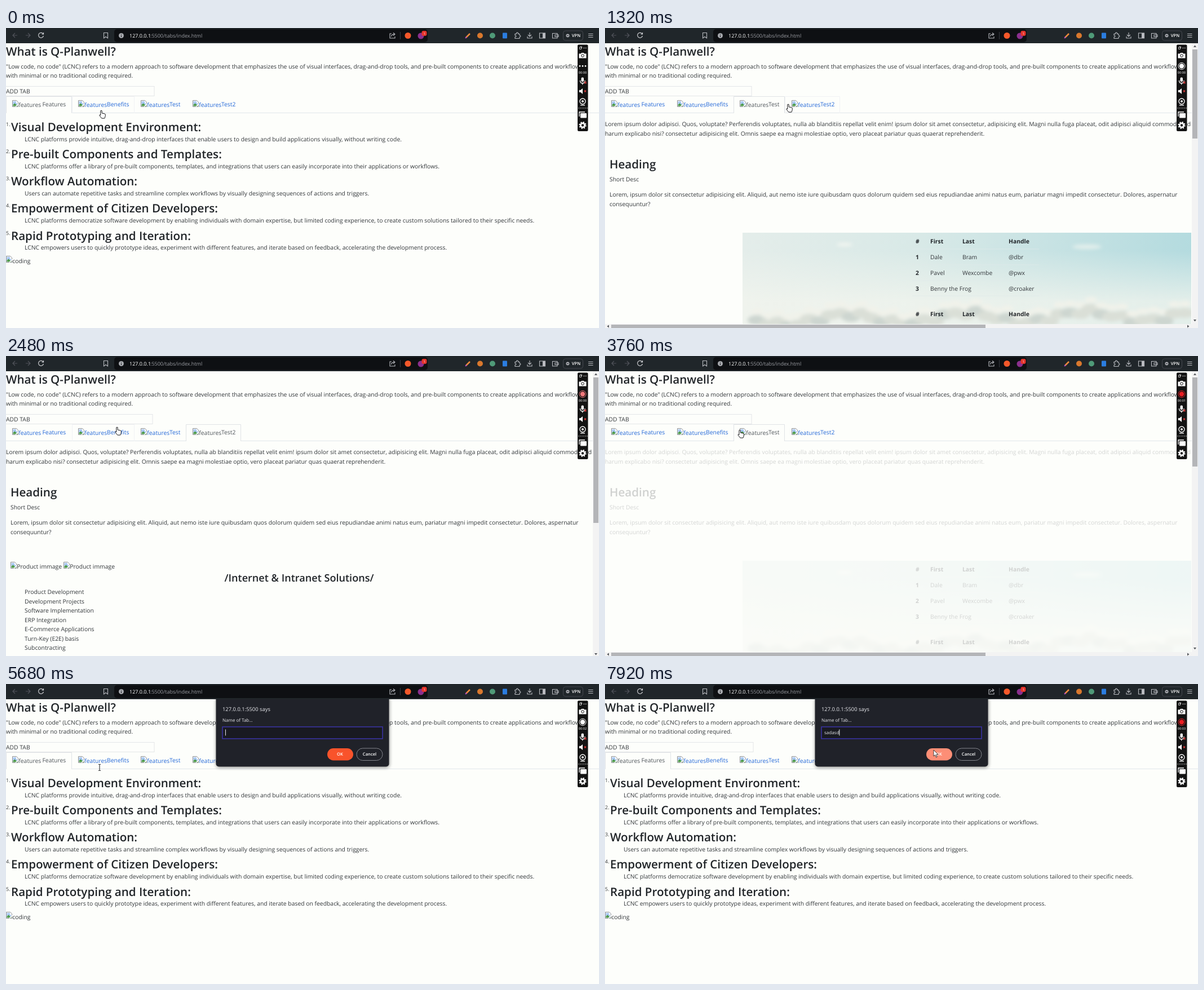
Animation, 1052 px wide and 532 px high, one loop 8 s. Source, as an HTML page:

```html
<!DOCTYPE html>
<html lang="en">
<head>
<meta charset="utf-8">
<title>Tabs demo</title>
<style>
html, body { margin: 0; width: 100%; height: 100%; overflow: hidden; background: #fdfefb; }
svg { display: block; }
text { font: 10.36px "Open Sans", sans-serif; fill: #33373b; text-rendering: geometricPrecision; }
.h2 { font-size: 20.6px; font-weight: 600; fill: #212529; }
.h3 { font-size: 18.1px; font-weight: 600; fill: #212529; text-anchor: middle; }
.b { font-weight: 700; fill: #212529; }
.num { font-size: 9px; }
.url { font-size: 9px; fill: #9a9ca2; }
.host { font-size: 9px; fill: #fff; }
.says { font-size: 9.4px; fill: #e8e9ed; }
.small { font-size: 8px; fill: #e8e9ed; }
.btn { font-size: 7.6px; font-weight: 600; fill: #fff; text-anchor: middle; }
.tiny { font-size: 5.6px; fill: #fff; text-anchor: middle; }
.tab text { fill: #2468d8; }
.tab.on text { fill: #50565c; }
.line { fill: none; stroke: #b9bbc0; stroke-width: 1.1; }
.white { fill: #fff; }
</style>
</head>
<body>
<svg width="1052" height="532" viewBox="0 0 1052 532">
  <defs>
    <linearGradient id="sky">
      <stop offset="0" stop-color="#e4edea"/><stop offset=".4" stop-color="#d8e9e7"/><stop offset="1" stop-color="#b4dbdf"/>
    </linearGradient>
    <linearGradient id="haze" x2="0" y2="1">
      <stop offset=".2" stop-color="#f3f5ee" stop-opacity="0"/><stop offset=".75" stop-color="#f3f5ee" stop-opacity=".75"/>
    </linearGradient>
    <filter id="soft"><feGaussianBlur stdDeviation="3"/></filter>
    <clipPath id="photo"><path d="M244 363H1040V525H244Z"/></clipPath>
    <symbol id="pic" overflow="visible">
      <path d="M.5 .5H7.5L10.5 3.5V11.5H.5Z" fill="#fff" stroke="#8b8f94"/>
      <path d="M1.5 2H7V5L9.5 6V8H1.5Z" fill="#a9c8f2"/>
      <path d="M1.5 10.5V8L4.5 5.5 10 10.5Z" fill="#4f9b4a"/>
      <path d="M6 11.5L11 6.5" stroke="#fff" stroke-width="1.5"/>
    </symbol>
  </defs>
  <g id="page"></g>
  <g id="panels"></g>
  <g id="scroll"></g>
  <g id="dialog"></g>
  <g id="chrome"></g>
  <g id="recorder"></g>
  <g id="cursor" stroke="#17181a" stroke-linejoin="round" fill="#fff">
    <path d="M-4.2 -6.2q1.2-1.4 2.4 0v4.2l4.6 1q1.8.5 1.6 2.2l-.6 3.6-1 2.4h-5l-3.8-4.8q-.6-1.6 1-1.4l.8.8z"/>
    <path d="M-2-5.5H-.5L0-5 .5-5.5H2M0-5V5M-2 5.5H-.5L0 5 .5 5.5H2" fill="none"/>
    <path d="M-2-7V4L.6 1.7 2.4 6 4.2 5.2 2.4 1.2H6Z" stroke-width=".8"/>
  </g>
</svg>
<script>
const $ = id => document.getElementById(id);
const text = (x, y, s, cls = '') => `<text x="${x}" y="${y}" class="${cls}">${s}</text>`;
const rect = (x, y, w, h, fill, rest = '') => `<rect x="${x}" y="${y}" width="${w}" height="${h}" fill="${fill}" ${rest}/>`;
const circle = (x, y, r, fill, rest = '') => `<circle cx="${x}" cy="${y}" r="${r}" fill="${fill}" ${rest}/>`;
const path = (d, rest = 'class="line"') => `<path d="${d}" ${rest}/>`;
const image = (x, y, alt, baseline = y + 12) => `<use href="#pic" x="${x}" y="${y}"/>` + text(x + 11.3, baseline, alt);

// Page header and tab strip
const edges = [0, 117, 228, 319, 417];
const tabShape = i => `M${edges[i] + .5} 151V121.5H${edges[i + 1] - .5}V151`;
$('page').innerHTML =
  text(0, 49, 'What is Q-Planwell?', 'h2') +
  text(0, 72, '"Low code, no code" (LCNC) refers to a modern approach to software development that emphasizes the use of visual interfaces, drag-and-drop tools, and pre-built components to create applications and workflows') +
  text(0, 88.3, 'with minimal or no traditional coding required.') +
  '<rect id="add" x="-.5" y="103.5" height="17" fill="none" stroke="#e4e6e8"/>' +
  text(0, 116, 'ADD TAB') +
  path('M0 150.5H1052', 'stroke="#e2e6ea"') +
  '<path id="hover" fill="none" stroke="#f1f2f4"/><path id="active" fill="#fdfefb" stroke="#e0e3e6"/>' +
  ['Features', 'Benefits', 'Test', 'Test2'].map((name, i) => {
    const x = [11, 128, 239, 331][i];
    return `<g class="tab">${image(x, 128, 'features', 140.3)}${text(x + (i ? 51 : 53.5), 139.2, name)}</g>`;
  }).join('');
const tabs = [...document.querySelectorAll('.tab')];

// Tab panels
const points = [
  ['Visual Development Environment:', 'LCNC platforms provide intuitive, drag-and-drop interfaces that enable users to design and build applications visually, without writing code.'],
  ['Pre-built Components and Templates:', 'LCNC platforms offer a library of pre-built components, templates, and integrations that users can easily incorporate into their applications or workflows.'],
  ['Workflow Automation:', 'Users can automate repetitive tasks and streamline complex workflows by visually designing sequences of actions and triggers.'],
  ['Empowerment of Citizen Developers:', 'LCNC platforms democratize software development by enabling individuals with domain expertise, but limited coding experience, to create custom solutions tailored to their specific needs.'],
  ['Rapid Prototyping and Iteration:', 'LCNC empowers users to quickly prototype ideas, experiment with different features, and iterate based on feedback, accelerating the development process.']
];
const features = points.map(([title, body], i) => {
  const y = 48.15 * i;
  return text(0, 174 + y, i + 1 + '.', 'num') + text(9, 183 + y, title, 'h2') + text(33, 200.5 + y, body);
}).join('') + image(0, 404, 'coding', 416.5);

const lorem =
  text(0, 174.2, 'Lorem ipsum dolor adipisci. Quos, voluptate? Perferendis voluptates, nulla ab blanditiis repellat velit enim! ipsum dolor sit amet consectetur, adipisicing elit. Magni nulla fuga placeat, odit adipisci aliquid commodi, sed') +
  text(0, 190.7, 'harum explicabo nisi? consectetur adipisicing elit. Omnis saepe ea magni molestiae optio, vero placeat pariatur quas quaerat reprehenderit.') +
  text(8, 249, 'Heading', 'h2') + text(8, 271.5, 'Short Desc') +
  text(8, 299, 'Lorem, ipsum dolor sit consectetur adipisicing elit. Aliquid, aut nemo iste iure quibusdam quos dolorum quidem sed eius repudiandae animi natus eum, pariatur magni impedit consectetur. Dolores, aspernatur') +
  text(8, 315.5, 'consequuntur?');

const row = (y, cells, cls) => cells.map((c, i) => c && text([551, 577, 634, 716][i], y, c, i ? cls : 'b')).join('');
const head = ['#', 'First', 'Last', 'Handle'];
const puff = (x, y, rx, ry, fill) => `<ellipse cx="${x}" cy="${y}" rx="${rx}" ry="${ry}" fill="${fill}"/>`;

// A bank of uneven puffs, pale on top and greyer below
const clouds = Array.from({ length: 42 }, (_, i) => {
  const x = 270 + i * 18.5, top = 502 + 9 * Math.sin(i * .55) + 5 * Math.sin(i * 2.3) - i * .2;
  return puff(x, top + 16, 17, 9, i % 3 ? '#dadfd7' : '#cdd6d0') + puff(x, top, 11, 5, '#f1f2ea');
}).join('');
const test = lorem +
  rect(244, 363, 796, 162, 'url(#sky)') + rect(244, 363, 796, 162, 'url(#haze)') +
  '<g clip-path="url(#photo)"><g filter="url(#soft)">' +
  puff(855, 388, 26, 4, '#e3efec') + puff(425, 384, 14, 3, '#f3f6f1') + clouds + '</g></g>' +
  [392, 420, 448, 475].map(y => path(`M545 ${y}H770`, 'stroke="#dfe8e8" stroke-opacity=".7"')).join('') +
  row(382, head, 'b') + row(410, ['1', 'Dale', 'Bram', '@dbr']) + row(438, ['2', 'Pavel', 'Wexcombe', '@pwx']) +
  row(466, ['3', 'Benny the Frog', '', '@croaker']) + row(510.5, head, 'b');

const test2 = lorem + image(8, 365, 'Product immage', 377.3) + image(102, 365, 'Product immage', 377.3) +
  text(520, 400, '/Internet &amp; Intranet Solutions/', 'h3') +
  ['Product Development', 'Development Projects', 'Software Implementation', 'ERP Integration', 'E-Commerce Applications',
    'Turn-Key (E2E) basis', 'Subcontracting'].map((s, i) => text(33, 422.3 + 16.45 * i, s)).join('');

const panels = { 0: features, 2: test, 3: test2 };
for (const i in panels) $('panels').innerHTML += `<g id="panel${i}">${panels[i]}</g>`;

// Scrollbars for the two long panels
const arrow = (x, y, dx, dy) => path(`M${x + 2.5 * dx} ${y + 2.5 * dy}L${x + 2.5 * dy - dx} ${y + 2.5 * dx - dy}L${x - 2.5 * dy - dx} ${y - 2.5 * dx - dy}Z`, 'fill="#55585c"');
const vertical = (bottom, thumbEnd) => rect(1041, 27, 11, bottom - 27, '#f3f3f3') +
  rect(1042, 38, 9, thumbEnd - 38, '#b4b5b8') + arrow(1046.5, 33, 0, -1);
const scrollbars = {
  2: vertical(525, 196) + arrow(1046.5, 518, 0, 1) + rect(0, 525, 1052, 7, '#f3f3f3') + rect(11, 526, 664, 6, '#b4b5b8') +
    arrow(6, 529, -1, 0) + arrow(1034, 529, 1, 0),
  3: vertical(532, 296) + arrow(1046.5, 528, 0, 1)
};
for (const i in scrollbars) $('scroll').innerHTML += `<g id="bars${i}">${scrollbars[i]}</g>`;

// Prompt dialog
$('dialog').innerHTML =
  rect(373, 24, 307, 124, '#000', 'rx="5" opacity=".45" filter="url(#soft)"') + rect(372.5, 22, 307, 124.5, '#202229', 'rx="5"') +
  text(384, 47.5, '127.0.0.1:5500 says', 'says') + text(384, 66.5, 'Name of Tab...', 'small') +
  rect(384, 76, 284, 21, '#191a21', 'stroke="#3b34a8" stroke-width="1.5"') +
  '<text id="typed" x="389" y="89" class="small"></text><path id="caret" stroke="#e8e9ed"/>' +
  '<rect id="ok" x="570" y="114" width="46" height="21.5" rx="10.7"/>' + text(592.5, 127.4, 'OK', 'btn') +
  rect(622, 114, 46, 21.5, 'none', 'rx="10.7" stroke="#84868d"') + text(645, 127.4, 'Cancel', 'btn');

// Browser bar
$('chrome').innerHTML =
  rect(0, 0, 1052, 27, '#20262a') + rect(192, 2, 556, 23, '#0e1013', 'rx="5"') +
  path('M20 13H12M16 9L12 13L16 17M35 13H43M39 9L43 13L39 17', 'fill="none" stroke="#50535a" stroke-width="1.2"') +
  path('M66 10.5A4.5 4.5 0 1 0 66.5 14M66.5 8V11H63.5', 'fill="none" stroke="#d0d1d5" stroke-width="1.2"') +
  path('M173.5 8.5H180.5V18L177 15.5L173.5 18Z') +
  circle(204.5, 13.5, 4.5, '#a6a8ad') + path('M204.5 13V16M204.5 10.8V11.8', 'stroke="#0e0f13"') +
  text(219, 16.5, '127.0.0.1', 'host') + text(256, 16.5, ':5500/tabs/index.html', 'url') +
  path('M684 10H681V18H690V15M683.5 15Q684 11 689 11M687 8.5L690 11L687 13.5') + path('M699.5 7V20', 'stroke="#3a3c43"') +
  circle(713, 13.5, 5.5, '#f4582a') + circle(736, 14, 5.5, '#8b2f8d') +
  rect(737.5, 5, 9, 9, '#e5352c', 'rx="3"') + text(742, 11.5, '1', 'tiny') +
  path('M816 17L823 10', 'stroke="#f08a3c" stroke-width="2.5"') + path('M815 18L817 16', 'stroke="#b54fd0" stroke-width="2"') +
  circle(841, 13.5, 5, '#d9782d') + circle(863, 13.5, 5, '#4f9a78') + rect(881, 8.5, 8, 10, '#2b7de0', 'rx="1"') +
  path('M903 10.5H905.5Q905 8 907 8T908.5 10.5H911V13Q913 13 913 14.5T911 16V18.5H903V16Q905 16 905 14.5T903 13Z') +
  path('M929 8V15M926 12L929 15L932 12M925 15V18H933V15') +
  path('M946.5 9H956.5V18H946.5Z') + rect(952, 9, 4.5, 9, '#b9bbc0') +
  path('M969.5 9.5H978V18H969.5ZM974 12H980V15.5H974Z') +
  rect(988.5, 5, 35, 17, 'none', 'rx="4" stroke="#44474e"') + circle(996.5, 13.5, 3, '#a9abb0') + path('M995 13.5H998', 'stroke="#202329"') +
  text(1011.5, 16.2, 'VPN', 'btn') + path('M1033 10.5H1041.5M1033 13.5H1041.5M1033 16.5H1041.5');

// Screen recorder strip
const light = 'fill="none" stroke="#fff" stroke-width="1.3"';
$('recorder').innerHTML =
  rect(1014, 29.5, 18.5, 153.5, '#131313', 'rx="2"') +
  path('M1017.5 34H1020.5V37.5H1017.5ZM1019 34V33H1021.5V36', 'fill="none" stroke="#ddd" stroke-width=".8"') +
  path('M1024 35.5H1030', 'stroke="#ddd" stroke-dasharray="1.3 1"') +
  path('M1016.5 45.5H1020L1021 44H1025L1026 45.5H1029.5V53.5H1016.5Z', 'class="white"') + circle(1023, 49, 2.4, '#fff', 'stroke="#131313"') +
  `<g id="dots">${[1018, 1023, 1028].map(x => circle(x, 67.5, 1.4, '#fff')).join('')}</g>` +
  '<g id="rec"><circle cx="1023" cy="67.5" r="6" fill="none"/><circle cx="1023" cy="67.5" r="4.2" stroke="none"/></g>' +
  '<text id="clock" x="1023" y="81" class="tiny"></text>' +
  rect(1020.5, 87.5, 4.5, 8, '#fff', 'rx="2.2"') + path('M1018.5 93Q1018.5 98 1022.7 98T1027 93M1022.7 98V100.5', light) +
  path('M1017 110H1019.5L1023 107V117L1019.5 114H1017Z', 'class="white"') +
  path('M1026 95L1029.5 98.5M1029.5 95L1026 98.5M1026 110.5L1029 113.5M1029 110.5L1026 113.5', 'stroke="#d93a3a" stroke-width="1.2"') +
  circle(1023, 130, 5, 'none', 'stroke="#fff" stroke-width="1.3"') + circle(1023, 130, 2, '#fff') + path('M1019 137H1027', light) +
  path('M1015 142H1032', 'stroke="#aaa" stroke-dasharray="2 1"') +
  path('M1017 157V149H1027', light) + rect(1019, 151, 11, 8.5, '#fff', 'rx="1"') +
  circle(1023, 172.5, 3.6, 'none', 'stroke="#fff" stroke-width="2.8"') +
  circle(1023, 172.5, 5.6, 'none', 'stroke="#fff" stroke-width="2" stroke-dasharray="2.2 2.2"');

// Timeline
const loop = 8000, fadeOut = 220, fadeIn = 280;
const clicks = [[-2000, 0], [700, 2], [1780, 3], [2640, 0], [3484, 2], [4480, 0]];
const late = [4240, 4360, 4520, 4720, 4880, 5000, 5080, 5200, 5360, 5480, 5680, 5800, 5920, 6040, 6200, 6320,
  6440, 6560, 6720, 6840, 6960, 7080, 7240, 7360, 7480, 7640, 7760, 7920];
const keys = [6200, 6320, 6560, 6720, 6960, 7080];
const route = [[0, 172, 153], [300, 205, 144], [640, 268, 138], [960, 272, 138], [1320, 328, 142], [1680, 366, 138],
  [1960, 366, 138], [2480, 200, 133], [2620, 95, 137], [2960, 88, 138], [3400, 240, 138], [3960, 243, 138],
  [4480, 66, 138], [4720, 62, 136], [5200, 30, 113], [5400, 30, 113], [5680, 166, 148], [7080, 168, 148],
  [7760, 578, 126], [7920, 585, 124], [8000, 585, 124]];
const clamp = v => Math.max(0, Math.min(1, v));
const show = (el, on) => el.style.display = on ? '' : 'none';

function cursorAt(t) {
  const i = Math.max(1, route.findIndex(k => k[0] > t));
  const [a, b] = [route[i - 1], route[i]];
  const u = clamp((t - a[0]) / (b[0] - a[0])), e = u * u * (3 - 2 * u);
  return [a[1] + (b[1] - a[1]) * e, a[2] + (b[2] - a[2]) * e];
}

function draw(time) {
  const t = time < 4240 ? Math.floor(time / 40) * 40 : late.filter(s => s <= time).pop();

  // Old panel fades out, then the new one fades in
  const n = clicks.filter(c => c[0] <= t).length - 1;
  const since = t - clicks[n][0], leaving = n > 0 && since < fadeOut;
  const panel = clicks[leaving ? n - 1 : n][1];
  const active = since < 60 && n ? clicks[n - 1][1] : clicks[n][1];
  const opacity = leaving ? 1 - since / fadeOut : clamp((since - fadeOut) / fadeIn);
  for (const i in panels) {
    show($('panel' + i), +i === panel);
    $('panel' + i).style.opacity = opacity;
  }
  for (const i in scrollbars) show($('bars' + i), +i === panel);
  $('add').setAttribute('width', panel ? 260.5 : 263.5);
  tabs.forEach((el, i) => el.classList.toggle('on', i === active));
  $('active').setAttribute('d', tabShape(active));

  const open = t >= 5360;
  show($('dialog'), open);
  const [x, y] = cursorAt(t);
  const over = open || y < 127 ? -1 : edges.findIndex((e, i) => x >= e && x < edges[i + 1]);
  $('hover').setAttribute('d', over < 0 ? '' : tabShape(over));
  const shape = !open ? 0 : x < 373 ? 1 : 2;
  [...$('cursor').children].forEach((el, i) => show(el, i === shape));
  $('cursor').setAttribute('transform', `translate(${x} ${y})`);

  const count = keys.filter(k => k <= t).length;
  $('typed').textContent = 'sadasd'.slice(0, count);
  const end = 389.5 + (count && open ? $('typed').getComputedTextLength() : 0);
  $('caret').setAttribute('d', `M${end} 80.5V91.5`);
  $('ok').setAttribute('fill', x > 570 ? '#fd8e76' : '#f9532b');

  // Recorder light pulses between white and red
  const m = t % 3600;
  const red = m < 1800 ? 1 - clamp((m - 920) / 180) : clamp((m - 2300) / 300);
  const color = `rgb(${255 - 22 * red},${255 - 225 * red},${255 - 220 * red})`;
  $('rec').setAttribute('fill', color);
  $('rec').setAttribute('stroke', color);
  show($('rec'), t >= 520);
  show($('dots'), t < 520);
  $('clock').textContent = '00:0' + [2560, 4360, 6160].filter(s => s <= t).length;
}

function tick() {
  draw(performance.now() % loop);
  requestAnimationFrame(tick);
}
tick();
</script>
</body>
</html>
```
